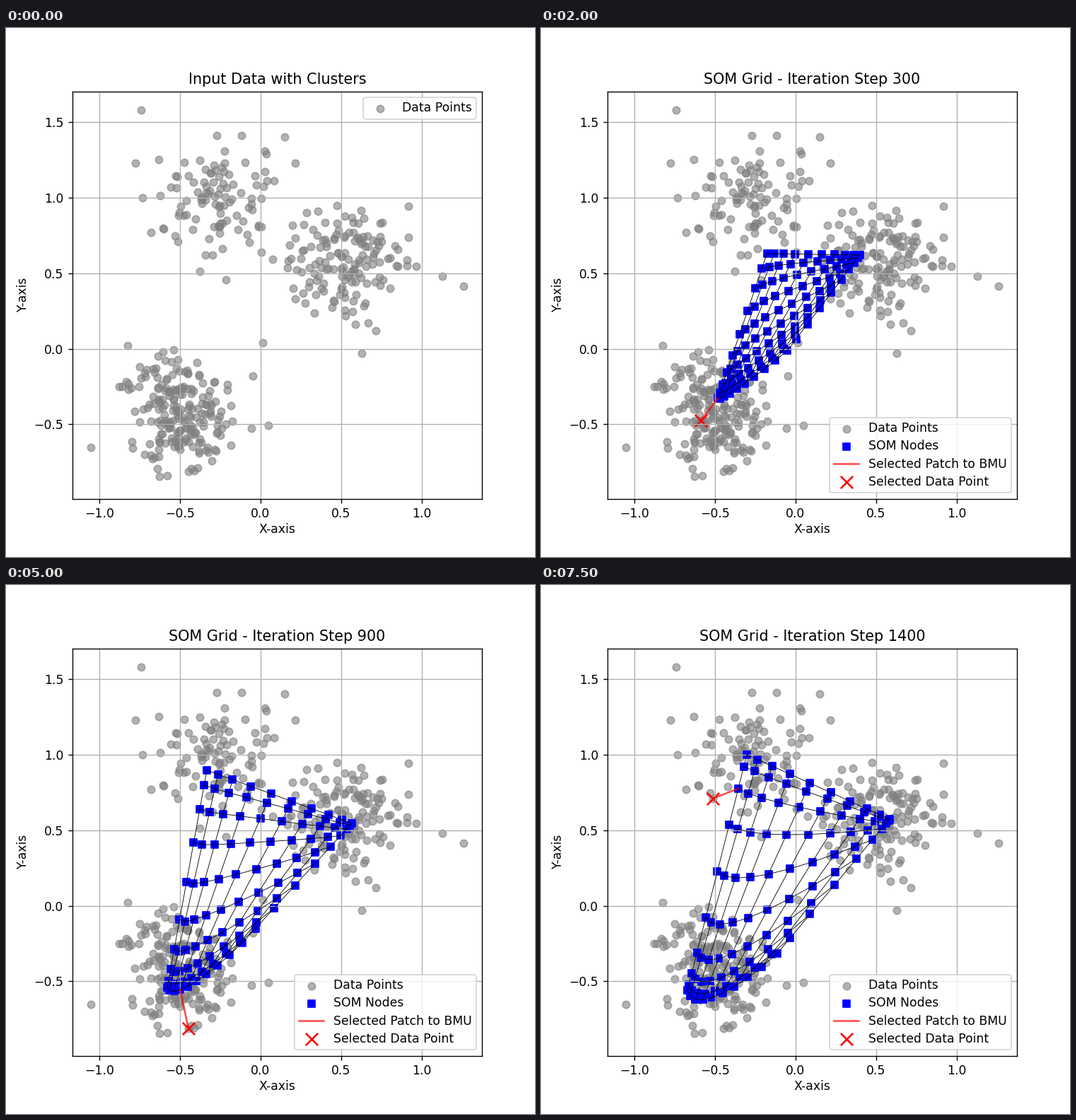
A matplotlib script for the animation above (8000 ms loop, 748 by 748 pixels).

```python
import numpy as np
import matplotlib.pyplot as plt
from matplotlib.animation import FuncAnimation

SIZE, FRAMES, INTERVAL = 748, 16, 500
LAST_STEP = 1400
ORIGIN = np.array([359.8, 453.6])   # stage pixel of data (0, 0)
SCALE = np.array([228.2, -213.6])   # pixels per data unit
U = np.linspace(0, 1, 10)
rng = np.random.default_rng(7)

# Paths of the mesh corners, in stage pixels, at the key steps
KEYS = [100, 500, 900, 1200, LAST_STEP]
TOP_LEFT = [(335, 306), (304, 332), (284, 262), (296, 247), (291, 240)]
TOP_RIGHT = [(438, 321), (464, 321), (489, 337), (488, 336), (493, 331)]
LOW_LEFT = [(262, 495), (238, 552), (228, 569), (213, 562), (207, 573)]
LOW_RIGHT = [(346, 447), (350, 466), (334, 506), (337, 515), (334, 521)]
CENTRE = [0.44, 0.27, 0.42, 0.44, 0.44]   # where the left edge moves fastest

# Data point drawn at every 100th step
PICKS = [(440, 293), (366, 203), (246, 596), (226, 555), (216, 525),
         (428, 366), (230, 564), (399, 329), (228, 558), (258, 627),
         (215, 510), (250, 586), (212, 481), (210, 607), (243, 302)]

# Far points that stand apart from the clusters
STRAYS = [(191, 116), (183, 191), (394, 154), (409, 191), (193, 240),
          (569, 252), (580, 337), (617, 351), (647, 365), (503, 460),
          (363, 445), (349, 492), (371, 562), (347, 566), (172, 449),
          (120, 593)]


def to_data(px):
    return (np.asarray(px, float) - ORIGIN) / SCALE


def cluster(n, centre, spread, reach=2.3):
    z = rng.normal(size=(n * 2, 2))
    return z[np.hypot(*z.T) < reach][:n] * spread + centre


def track(step, path):
    """Value at a step along a path of key values."""
    path = np.asarray(path, float)
    if path.ndim == 1:
        return np.interp(step, KEYS, path)
    return np.array([np.interp(step, KEYS, axis) for axis in path.T])


def warp(v, k, c):
    """Sigmoid spacing from 0 to 1 with steepness k and centre c."""
    a, b = np.tanh(-k * c), np.tanh(k * (1 - c))
    return (np.tanh(k * (v - c)) - a) / (b - a)


def lerp(a, b, t):
    return a + (b - a) * t[..., None]


def mesh(step):
    """Straight columns strung between a top and a bottom row."""
    p = step / LAST_STEP
    top = lerp(track(step, TOP_LEFT), track(step, TOP_RIGHT),
               warp(U, 2, 0.48))
    low = lerp(track(step, LOW_LEFT), track(step, LOW_RIGHT), U ** 1.6)
    low[:, 1] += 25 * p * 4 * U * (1 - U)
    c = track(step, CENTRE)
    c = c + (0.7 - c) * U ** (0.7 + 1.5 * p)
    return lerp(top, low, warp(U[:, None], 2 + 1.5 * p, c))


points = to_data(np.vstack([
    STRAYS, PICKS,
    cluster(98, (303, 248), (46, 48)),
    cluster(142, (481, 342), (46, 44)),
    cluster(190, (246, 548), (42, 42))]))
start = rng.uniform((362, 246), (578, 452), (10, 10, 2))

fig, ax = plt.subplots(figsize=(6, 6), dpi=SIZE / 6)


def draw_map(step, pick):
    nodes = to_data(mesh(step) if step else start)
    x, y = nodes[..., 0], nodes[..., 1]
    ax.scatter(x, y, color="blue", marker="s", label="SOM Nodes")
    ax.plot(x, y, color="black", lw=0.5)
    ax.plot(x.T, y.T, color="black", lw=0.5)
    flat = nodes.reshape(-1, 2)
    best = flat[np.argmin(np.hypot(*(flat - pick).T))]
    ax.plot(*zip(pick, best), color="red", alpha=0.7,
            label="Selected Patch to BMU")
    ax.scatter(*pick, color="red", marker="x", s=100,
               label="Selected Data Point")


def draw(frame):
    ax.clear()
    ax.scatter(*points.T, color="gray", alpha=0.6, label="Data Points")
    if frame == 0:
        ax.set_title("Input Data with Clusters")
    else:
        step = (frame - 1) * 100
        draw_map(step, to_data(PICKS[frame - 1]))
        ax.set_title(f"SOM Grid - Iteration Step {step}")
    ax.set(xlim=(-1.167, 1.373), ylim=(-0.993, 1.703))
    ax.set_xlabel("X-axis", labelpad=2.5)
    ax.set_ylabel("Y-axis")
    ax.grid(True)
    ax.legend(loc="lower right" if frame else "upper right",
              labelspacing=0.42, borderpad=0.35)
    return ax.get_children()


anim = FuncAnimation(fig, draw, frames=FRAMES, interval=INTERVAL,
                     init_func=lambda: draw(0), repeat=True, repeat_delay=0)
plt.show()
```
